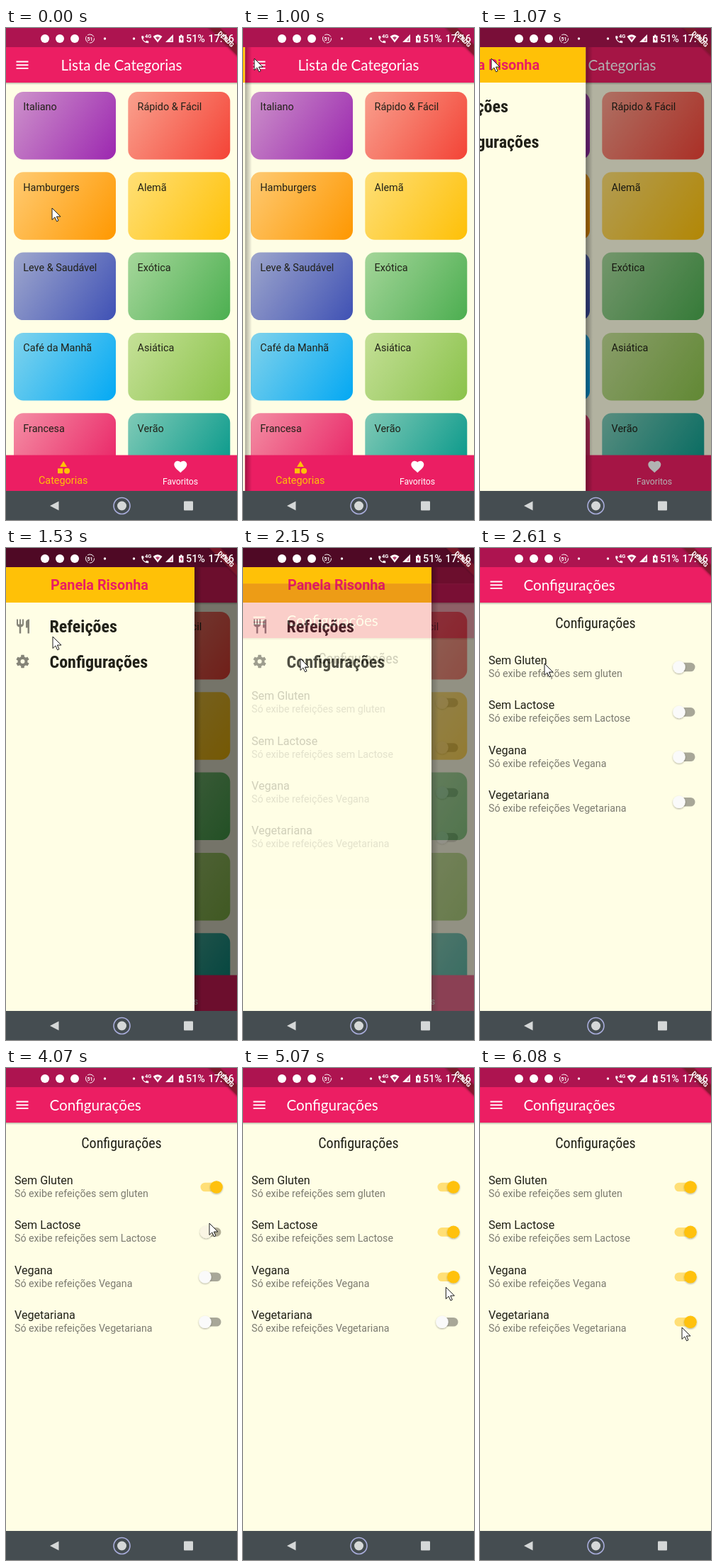
An HTML page that plays this animation: 326x694 px, repeating every 6.16 s.

```html
<!DOCTYPE html>
<html lang="pt">
<head>
<meta charset="utf-8">
<title>Categorias</title>
<style>
  html, body { margin: 0; width: 100%; height: 100%; overflow: hidden; background: #fffee5; }
  svg { display: block; width: 326px; height: 694px; }
  text { font: 14.4px Roboto, sans-serif; fill: #212118; }
  .bar { font: 20.6px Raleway, Lato, sans-serif; fill: #fff; }
  .mid { text-anchor: middle; }
  .cond { font-family: "Roboto Condensed", Roboto, sans-serif; font-stretch: 75%; }
  .head { font-size: 20px; }
  .item { font-size: 24px; font-weight: 700; }
  .brand { font-size: 19.8px; font-weight: 700; fill: #e91e63; }
  .name { font-size: 16.1px; }
  .note { font-size: 14.2px; fill: #7c7b70; }
  .status text { font-size: 14.4px; font-weight: 500; fill: #fff; }
  .status .tiny { font-size: 7px; font-weight: 700; }
  .status .debug { font-size: 8.6px; font-weight: 900; }
</style>
</head>
<body>
<svg viewBox="0 0 326 694">
  <defs id="defs">
    <linearGradient id="edge"><stop stop-opacity=".32"/><stop offset="1" stop-opacity="0"/></linearGradient>
    <linearGradient id="drop" x2="0" y2="1"><stop stop-opacity=".28"/><stop offset="1" stop-opacity="0"/></linearGradient>
    <filter id="soft" x="-50%" y="-50%" width="200%" height="200%">
      <feDropShadow dx="0" dy="1" stdDeviation="1" flood-opacity=".35"/>
    </filter>
    <g id="appbar">
      <rect width="326" height="27.5" fill="#ad1450"/>
      <rect y="27" width="326" height="50" fill="#ec1e63"/>
      <rect y="77" width="326" height="3" fill="url(#drop)"/>
      <path d="M14.500 47.500h17M14.500 52.200h17M14.500 56.900h17" stroke="#fff" stroke-width="1.900"/>
    </g>
  </defs>

  <g id="home">
    <rect width="326" height="654" fill="#fffee5"/>
    <g id="cards"></g>
    <use href="#appbar"/>
    <text class="bar mid" x="163" y="59.500">Lista de Categorias</text>
    <rect y="602.500" width="326" height="51" fill="#ec1e63"/>
    <g fill="#ffc107" transform="translate(70.300 609) scale(.9)">
      <path d="M12 2 6.500 11h11zM3 13.500h8v8H3z"/><circle cx="17.500" cy="17.500" r="4.500"/>
    </g>
    <text class="mid" x="80.700" y="643" style="fill:#ffc107">Categorias</text>
    <path fill="#fff" transform="translate(235.500 608) scale(.9)" d="M12 21.350l-1.450-1.320C5.400 15.360 2 12.280 2 8.500 2 5.420 4.420 3 7.500 3c1.740 0 3.410.81 4.500 2.090C13.090 3.810 14.760 3 16.500 3 19.580 3 22 5.420 22 8.500c0 3.780-3.400 6.860-8.550 11.540z"/>
    <text class="mid" x="246" y="643.500" style="fill:#fff;font-size:12.200px">Favoritos</text>
  </g>

  <rect id="scrim" width="326" height="654"/>
  <g id="drawer">
    <rect x="266" y="27" width="10" height="627" fill="url(#edge)"/>
    <rect y="27" width="266" height="627" fill="#fffee5"/>
    <rect y="27" width="266" height="50" fill="#ffc107"/>
    <text class="brand mid" x="132" y="59">Panela Risonha</text>
    <g fill="#858478">
      <path transform="translate(12 98.500)" d="M11 9H9V2H7v7H5V2H3v7c0 2.120 1.660 3.840 3.750 3.970V22h2.500v-9.030C11.340 12.840 13 11.120 13 9V2h-2zm5-3v8h2.500v8H21V2c-2.760 0-5 2.240-5 4z"/>
      <g id="gear" transform="translate(23.500 160)">
        <circle r="5" fill="none" stroke="#858478" stroke-width="4"/>
      </g>
    </g>
    <text class="cond item" x="61.500" y="119">Refeições</text>
    <text class="cond item" x="61.500" y="168.500">Configurações</text>
  </g>

  <g id="settings">
    <rect width="326" height="654" fill="#fffee5"/>
    <use href="#appbar"/>
    <text class="bar" x="61.500" y="59.500">Configurações</text>
    <text class="cond head mid" x="163" y="113">Configurações</text>
    <g id="rows"></g>
  </g>

  <g fill="#d5d8d8">
    <rect y="653" width="326" height="41" fill="#454d51"/>
    <path d="M62 674 74.500 667.500v13z"/>
    <circle cx="163.500" cy="674" r="11.500" fill="none" stroke="#a9addb" stroke-width="1.600"/>
    <circle cx="163.500" cy="674" r="6.500"/>
    <rect x="251" y="667.500" width="13" height="13" rx="1"/>
  </g>

  <g class="status" fill="#fff">
    <g transform="translate(326 0) rotate(45)">
      <rect x="-40" y="16.500" width="80" height="11" fill="#7d1a2b" fill-opacity=".85" filter="url(#soft)"/>
      <text class="debug mid" x="0" y="25">DEBUG</text>
    </g>
    <circle cx="55" cy="15" r="6"/><circle cx="76" cy="15" r="6"/><circle cx="97" cy="15" r="6"/>
    <circle cx="118.500" cy="15" r="6" fill="none" stroke="#fff" stroke-dasharray="10 2"/>
    <text class="tiny mid" x="118.500" y="17.600">51</text>
    <circle cx="139.500" cy="15" r="1.700"/><circle cx="180.500" cy="15" r="1.700"/>
    <path transform="translate(189.500 9.500) scale(.56)" d="M6.620 10.790c1.440 2.830 3.760 5.140 6.590 6.590l2.200-2.200c.27-.27.67-.36 1.020-.24 1.120.37 2.330.57 3.570.57.55 0 1 .45 1 1V20c0 .55-.45 1-1 1C10.610 21 3 13.390 3 4c0-.55.45-1 1-1h3.500c.55 0 1 .45 1 1 0 1.250.2 2.450.57 3.570.11.35.03.74-.25 1.020z"/>
    <text class="tiny" x="196" y="14" style="font-size:7.500px">4G</text>
    <path d="M207.500 12Q214 6.500 220.500 12L214 20.500zM225 20h11V9z"/>
    <path d="M211 13.500q3-2.500 6 0L214 17z" fill="#ad1450" fill-opacity=".8"/>
    <path d="M231 18.500h3.500V13z" fill="#ad1450" fill-opacity=".6"/>
    <path d="M244 11h2v-1.500h2.500V11h2v9.500h-6.500z"/>
    <path d="M247.800 12l-2.300 4h1.500v3l2.200-4h-1.400z" fill="#ad1450"/>
    <text x="254" y="20">51%</text>
    <text x="285.500" y="20">17:16</text>
  </g>

  <path id="cursor" d="M0 0V16.500L3.900 12.900 6.600 18.800 9 17.700 6.400 12H12z" fill="#fff" stroke="#1c1c1c" stroke-linejoin="round"/>
</svg>

<script>
const LOOP = 6160, FPS = 13;
const $ = id => document.getElementById(id);

const cards = [
  ['Italiano', '#9c27b0'], ['Rápido & Fácil', '#f44336'],
  ['Hamburgers', '#ff9800'], ['Alemã', '#ffc107'],
  ['Leve & Saudável', '#3f51b5'], ['Exótica', '#4caf50'],
  ['Café da Manhã', '#03a9f4'], ['Asiática', '#8bc34a'],
  ['Francesa', '#e91e63'], ['Verão', '#009688']
];
$('defs').innerHTML += cards.map(([, color], i) =>
  `<linearGradient id="c${i}" gradientUnits="userSpaceOnUse" x2="144" y2="96">
    <stop stop-color="${color}" stop-opacity=".5"/><stop offset="1" stop-color="${color}"/>
  </linearGradient>`).join('');
$('cards').innerHTML = cards.map(([label, ], i) =>
  `<g transform="translate(${11 + i % 2 * 161.3} ${90 + (i >> 1) * 113.3})">
    <rect width="144" height="95.5" rx="13.5" fill="url(#c${i})"/>
    <text x="13.3" y="26.4">${label.replace('&', '&amp;')}</text>
  </g>`).join('');

const diets = [
  ['Sem Gluten', 'sem gluten', 3400], ['Sem Lactose', 'sem Lactose', 4040],
  ['Vegana', 'Vegana', 4730], ['Vegetariana', 'Vegetariana', 5480]
];
$('rows').innerHTML = diets.map(([name, note], i) =>
  `<g transform="translate(0 ${i * 63.4})">
    <text class="name" x="12" y="164">${name}</text>
    <text class="note" x="12" y="182">Só exibe refeições ${note}</text>
    <rect class="track" x="274.500" y="161.700" width="29" height="12.600" rx="6.300"/>
    <circle class="thumb" cx="281" cy="168" r="8.800" filter="url(#soft)"/>
  </g>`).join('');
const tracks = document.querySelectorAll('.track');
const thumbs = document.querySelectorAll('.thumb');

for (let a = 0; a < 360; a += 60)
  $('gear').innerHTML += `<rect x="-2.300" y="-9.200" width="4.600" height="4" rx=".6" transform="rotate(${a})"/>`;

// Pointer stops: time, x, y
const stops = [
  [0, 65, 254], [154, 23, 194], [235, 23, 194], [800, 16, 43], [1130, 16, 43],
  [1538, 66, 125], [1920, 81, 156], [2310, 81, 156], [2615, 91, 163], [3300, 287, 161],
  [3620, 287, 161], [4000, 287, 219], [4240, 287, 219], [4620, 287, 284],
  [4900, 287, 284], [5380, 285, 366], [LOOP, 285, 366]
];

const clamp = v => Math.min(1, Math.max(0, v));
const smooth = v => (v = clamp(v), v * v * (3 - 2 * v));
const mix = (a, b, k) => a + (b - a) * k;
const spring = s => s <= 0 ? 0 : 1 - (1 + 21.4 * s) * Math.exp(-22.4 * s);
const blend = (a, b, k) => `rgb(${a.map((v, i) => Math.round(mix(v, b[i], k)))})`;

function pointer(t) {
  const i = stops.findIndex(s => s[0] > t);
  const [t0, x0, y0] = stops[i - 1], [t1, x1, y1] = stops[i];
  const k = smooth((t - t0) / (t1 - t0));
  return `translate(${mix(x0, x1, k)} ${mix(y0, y1, k)})`;
}

function draw(t) {
  const open = spring((t - 995) / 1000);
  $('scrim').setAttribute('opacity', .54 * open);
  $('drawer').setAttribute('visibility', open ? 'visible' : 'hidden');
  $('drawer').setAttribute('transform', `translate(${266 * (open - 1)})`);

  const enter = clamp((t - 2035) / 300);
  $('settings').setAttribute('opacity', enter ** 1.7);
  $('settings').setAttribute('transform', `translate(0 ${160 * (1 - enter) ** 2.3})`);

  diets.forEach(([, , click], i) => {
    const k = smooth((t - click) / 200);
    thumbs[i].setAttribute('cx', mix(281, 297, k));
    thumbs[i].setAttribute('fill', blend([250, 250, 250], [255, 193, 7], k));
    tracks[i].setAttribute('fill', blend([168, 167, 152], [255, 223, 118], k));
  });
  $('cursor').setAttribute('transform', pointer(t));
}

function tick(now) {
  const step = Math.floor((now % LOOP + 9.3) * FPS / 1000);
  draw(Math.min(step * 1000 / FPS, LOOP - 1));
  requestAnimationFrame(tick);
}
draw(0);
requestAnimationFrame(tick);
</script>
</body>
</html>
```
